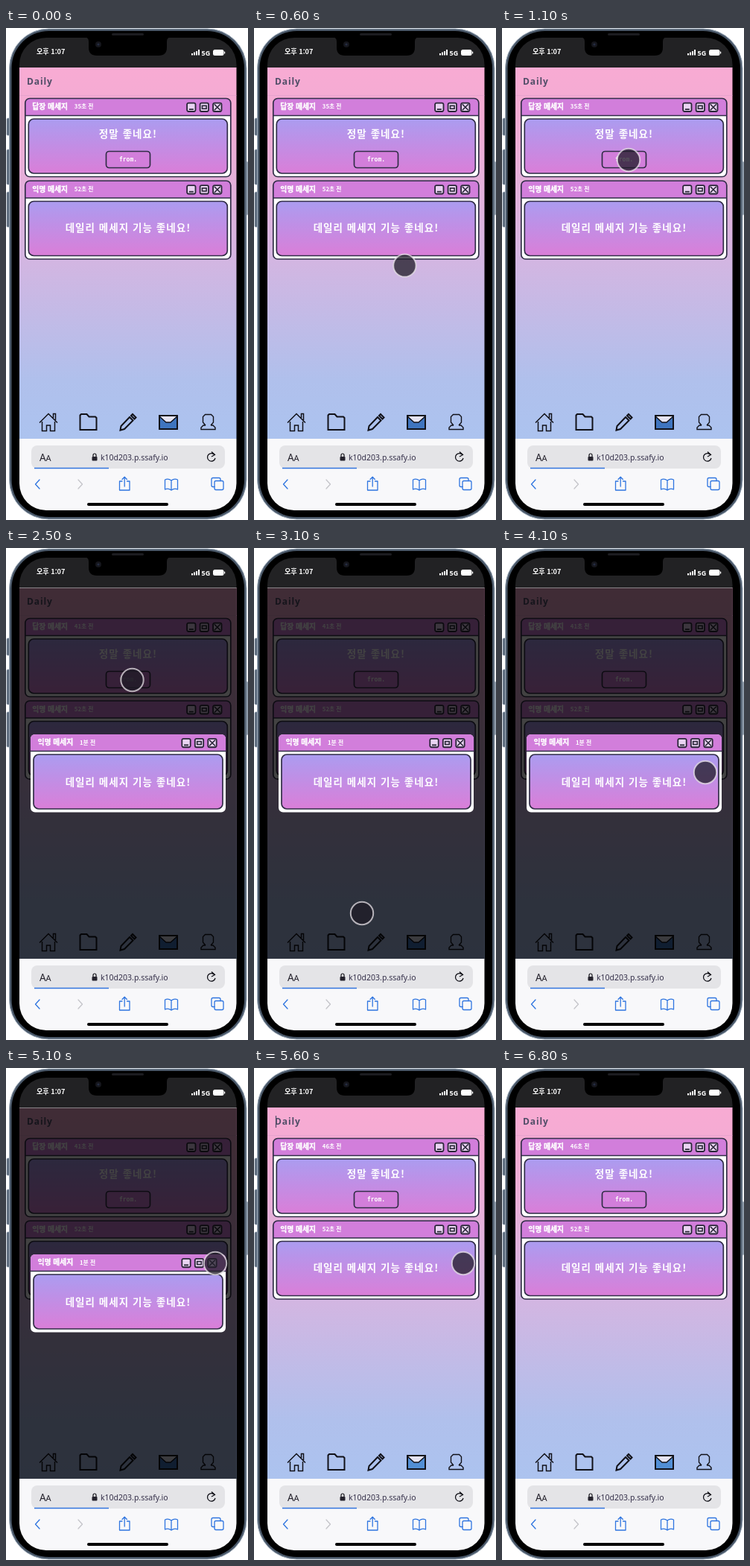
Write an HTML page that moves like this. It is 325 px wide and 660 px high and loops after 7 s.

```html
<!DOCTYPE html>
<html lang="ko">
<head>
<meta charset="utf-8">
<title>Daily</title>
<style>
html, body { margin: 0; width: 100%; height: 100%; overflow: hidden; background: #fff; }
svg { display: block; width: 325px; height: 660px; }
text { font-family: "Noto Sans CJK KR", "Noto Sans CJK", sans-serif; }
.mono { font-family: "DejaVu Sans Mono", monospace; }
.ui { font-family: "Noto Sans", sans-serif; }
.mid { text-anchor: middle; }
.white { fill: #fff; }
.title { font-size: 9.8px; font-weight: 900; stroke: #fff; stroke-width: .3px; }
.ago { font-size: 7.8px; font-weight: 700; }
.body { font-size: 13.5px; font-weight: 700; letter-spacing: 1.05px; }
.line { fill: none; stroke: #111118; stroke-width: 1.8; }
.blue { fill: none; stroke: #2f75e0; stroke-width: 1.3; stroke-linecap: round; stroke-linejoin: round; }
</style>
</head>
<body>
<svg viewBox="0 0 325 660" xmlns="http://www.w3.org/2000/svg">
  <defs>
    <linearGradient id="page" x1="0" y1="0" x2="0" y2="1">
      <stop offset="0" stop-color="#f8abd3"/>
      <stop offset=".12" stop-color="#f3abd3"/>
      <stop offset=".5" stop-color="#d5b5e1"/>
      <stop offset=".84" stop-color="#b0c0ec"/>
      <stop offset="1" stop-color="#acc3ef"/>
    </linearGradient>
    <linearGradient id="panel" x1="0" y1="0" x2="0" y2="1">
      <stop offset="0" stop-color="#ab9cf0"/>
      <stop offset="1" stop-color="#da7ed8"/>
    </linearGradient>
    <clipPath id="screen"><rect x="18" y="13" width="291.500" height="634" rx="36"/></clipPath>
    <g id="winButtons" fill="#e9d3f2" stroke="#2a2638" stroke-width="1.8">
      <rect x="-5.700" y="-5.700" width="11.400" height="11.400" rx="2"/>
      <path d="M-3 2.800H3"/>
      <rect x="11.800" y="-5.700" width="11.400" height="11.400" rx="2"/>
      <rect x="14.700" y="-2" width="5.600" height="4" stroke-width="1.6"/>
      <rect x="29.300" y="-5.700" width="11.400" height="11.400" rx="2"/>
      <path d="M31 -4L39 4M39 -4L31 4" stroke-width="1.6"/>
    </g>
  </defs>

  <!-- phone body -->
  <g fill="#59687a" stroke="#93a1b0" stroke-width=".7">
    <rect x="1" y="121" width="6" height="23" rx="1.5"/>
    <rect x="1" y="163" width="6" height="47" rx="1.5"/>
    <rect x="1" y="220" width="6" height="47" rx="1.5"/>
    <rect x="320" y="179" width="4.500" height="72" rx="1.5"/>
  </g>
  <rect x="4.500" y="1" width="318.500" height="658" rx="53" fill="#4a5869" stroke="#a3b0be"/>
  <rect x="7.500" y="4" width="312.500" height="652" rx="50"/>

  <g clip-path="url(#screen)">
    <rect x="18" y="13" width="292" height="41" fill="#222224"/>
    <rect x="18" y="53" width="292" height="498" fill="url(#page)"/>
    <path d="M18 90.500H310" stroke="#dd9fcb" stroke-opacity=".6"/>
    <text class="ui" x="28" y="76" font-size="12" letter-spacing=".9" font-weight="600" fill="#504d67">Daily</text>
    <path id="caret" d="M29.500 64V80" stroke="#504d67" stroke-width="1.2"/>
    <g id="cards"></g>

    <!-- page tabs -->
    <g class="line">
      <path d="M45 529.500L57 517.500L69 529.500M48.500 528V540.500H54.500V533H59.500V540.500H65.500V528M63.500 523V517.500H66.500V526" style="stroke-width:1.5"/>
      <path d="M99.500 539V519.500L101 518H108.500L111.500 521.500H120L121.500 523V539Z" style="stroke-width:2"/>
      <path d="M153.500 539.500L154.500 534L166 522L170.500 526.500L159 538ZM168 520L170 518L174.500 522.500L172.500 524.500Z" style="stroke-width:2"/>
      <g id="mail">
        <rect x="206" y="520" width="24" height="18" fill="#3f75bf"/>
        <path d="M207 521H229L221 529H215Z" fill="#e6e4f2" stroke="none"/>
        <path d="M206 521L215 529H221L230 521" style="stroke-width:1.4"/>
        <rect x="206" y="520" width="24" height="18"/>
      </g>
      <path d="M268 533L264.500 529V521.500L267.500 518.500H275.500L278.500 521.500V529L275 533M268 533H265L262 536V538.500H281V536L278 533H275" style="stroke-width:1.4"/>
    </g>

    <g id="modal">
      <rect x="18" y="53" width="292" height="498" opacity=".74"/>
      <path d="M18 53.500H310" stroke="#8a8489"/>
      <g id="dialog"></g>
    </g>

    <!-- browser bar -->
    <rect x="18" y="551" width="292" height="97" fill="#f8f8fa"/>
    <rect x="34" y="560" width="260" height="31" rx="8" fill="#e4e4e7"/>
    <path d="M38 590.500H138" stroke="#3375dd" stroke-width="1.5"/>
    <g fill="#24222c">
      <text class="ui" x="45" y="581" font-size="13.500">A</text>
      <text class="ui" x="53.500" y="581" font-size="11">A</text>
      <text class="ui" x="127" y="579.500" font-size="10.500" fill="#35304a">k10d203.p.ssafy.io</text>
      <rect x="115.500" y="575" width="7" height="5.500" rx="1"/>
    </g>
    <path d="M117 575V573A2 2 0 0 1 121 573V575" class="line" style="stroke-width:1.2"/>
    <path d="M280.300 573A5.300 5.300 0 1 0 281 577M276 568.500L280.500 572.500L276 575" class="line" style="stroke-width:1.3"/>
    <g class="blue">
      <path d="M45 606L39.500 612L45 618"/>
      <path d="M97 606L102.500 612L97 618" stroke="#c5c5ca"/>
      <path d="M156 608H152.500V620H166V608H162.500M159.200 615V602.500M156 605.500L159.200 602.300L162.400 605.500"/>
      <path d="M222 607Q218 604 213.500 606V619Q218 617 222 620Q226 617 230.500 619V606Q226 604 222 607V620"/>
      <rect x="280" y="607.500" width="12" height="12" rx="2"/>
      <path d="M280 615.500H278Q276 615.500 276 613.500V605.500Q276 603.500 278 603.500H286Q288 603.500 288 605.500V607.500"/>
    </g>
    <rect x="109" y="637" width="109" height="4" rx="2"/>
  </g>

  <!-- notch and status -->
  <path d="M106 12H221Q216 13 216 18V26Q216 37 205 37H122Q111 37 111 26V18Q111 13 106 12Z"/>
  <circle cx="124" cy="22" r="4" fill="#15161c"/>
  <circle cx="124" cy="22" r="1.600" fill="#252c42"/>
  <rect x="142" y="7" width="43" height="3" rx="1.500" fill="#1c1c20"/>
  <g class="white">
    <text x="41" y="35.300" font-size="9.100" font-weight="700">오후 1:07</text>
    <text class="ui" x="262.500" y="36.500" font-size="9" font-weight="700">5G</text>
    <path d="M249 34h2v2.500h-2zM252 32.500h2v4h-2zM255 31h2v5.500h-2zM258 29h2v7.500h-2z"/>
    <rect x="278" y="29" width="14.500" height="8" rx="2.500"/>
    <rect x="293" y="31.500" width="1.200" height="3" rx=".5"/>
  </g>

  <g id="cursor">
    <circle r="15" fill="#201b27" fill-opacity=".76"/>
    <circle r="15.200" fill="none" stroke="#e2dde2" stroke-opacity=".76" stroke-width="2"/>
  </g>
</svg>

<script>
const LOOP = 7000, STEP = 100;
const $ = id => document.getElementById(id);
const INK = '#312d47';

function card({ x, y, w, h, bar, title, ago, agoId, body, bodyY, border, pad }) {
  const top = y + bar, mid = top - bar / 2;
  return `
    <rect x="${x}" y="${y}" width="${w}" height="${h}" rx="6" fill="#fff"/>
    <path d="M${x} ${top}V${y + 6}q0 -6 6 -6H${x + w - 6}q6 0 6 6V${top}Z" fill="#d27edb"/>
    <path d="M${x} ${top}H${x + w}" stroke="${INK}" stroke-width="1.7"/>
    ${border ? `<rect x="${x}" y="${y}" width="${w}" height="${h}" rx="6" fill="none" stroke="${INK}" stroke-width="1.7"/>` : ''}
    <rect x="${x + pad}" y="${top + 4.5}" width="${w - pad * 2}" height="${h - bar - 9}" rx="7"
      fill="url(#panel)" stroke="${INK}" stroke-width="1.7"/>
    <g class="white">
      <text class="title" x="${x + 9.5}" y="${mid + 3}">${title}</text>
      <text class="ago" x="${x + 66}" y="${mid + 2.3}" ${agoId ? `id="${agoId}"` : ''}>${ago}</text>
      <text class="body mid" x="164" y="${bodyY + 5}">${body}</text>
    </g>
    <use href="#winButtons" x="${x + w - 53}" y="${mid + .3}"/>`;
}

const note = { title: '익명 메세지', body: '데일리 메세지 기능 좋네요!' };
const listed = { x: 25.8, w: 276, h: 105, bar: 23, border: true, pad: 4.5 };

$('cards').innerHTML =
  card({ ...listed, y: 94.5, title: '답장 메세지', ago: '35초 전', agoId: 'ago', body: '정말 좋네요!', bodyY: 142 }) +
  `<rect x="134.500" y="165.500" width="59" height="22" rx="4" fill="#d27edb" stroke="${INK}" stroke-width="1.7"/>
   <text class="mono mid white" x="164" y="178.500" font-size="8" font-weight="700">from.</text>` +
  card({ ...listed, ...note, y: 205, ago: '52초 전', bodyY: 268 });
$('dialog').innerHTML =
  card({ ...note, x: 33, y: 250, w: 262, h: 104.5, bar: 22.5, pad: 4, ago: '1분 전', bodyY: 314 });

// time, x, y, opacity
const PATH = [
  [0, 205, 330, 0], [100, 205, 330, 0], [400, 205, 330, 1], [500, 205, 330, 1],
  [1100, 170, 177, 1], [2500, 169.5, 177, 1],
  [3100, 145, 490, 1], [3200, 145, 493, 1],
  [4000, 271, 306, 1], [4100, 273, 301, 1],
  [4500, 277, 273, 1], [4600, 277, 273, 1],
  [5100, 281, 262, 1], [5700, 281, 262, 1], [6000, 281, 262, 0], [LOOP, 281, 262, 0]
];

function pointer(t) {
  const i = PATH.findIndex(k => k[0] > t);
  const a = PATH[i - 1], b = PATH[i];
  const p = (t - a[0]) / (b[0] - a[0]);
  const ease = p * p * (3 - 2 * p);
  const mix = n => a[n] + (b[n] - a[n]) * ease;
  return { x: mix(1), y: mix(2), alpha: a[3] + (b[3] - a[3]) * p };
}

const show = (id, on) => $(id).setAttribute('visibility', on ? 'visible' : 'hidden');

function draw(time) {
  const t = Math.floor((time % LOOP) / STEP) * STEP;
  const c = pointer(t);
  $('cursor').setAttribute('transform', `translate(${c.x} ${c.y})`);
  $('cursor').setAttribute('opacity', c.alpha);
  show('modal', t >= 2500 && t < 5500);
  show('caret', t >= 5500 && t < 5900);
  $('ago').textContent = (t < 2500 ? 35 : t < 5500 ? 41 : 46) + '초 전';
  $('mail').firstElementChild.setAttribute('fill', t < 5500 ? '#3f75bf' : '#528fd5');
}

const start = performance.now();
function tick() {
  draw(performance.now() - start);
  requestAnimationFrame(tick);
}
tick();
</script>
</body>
</html>
```
